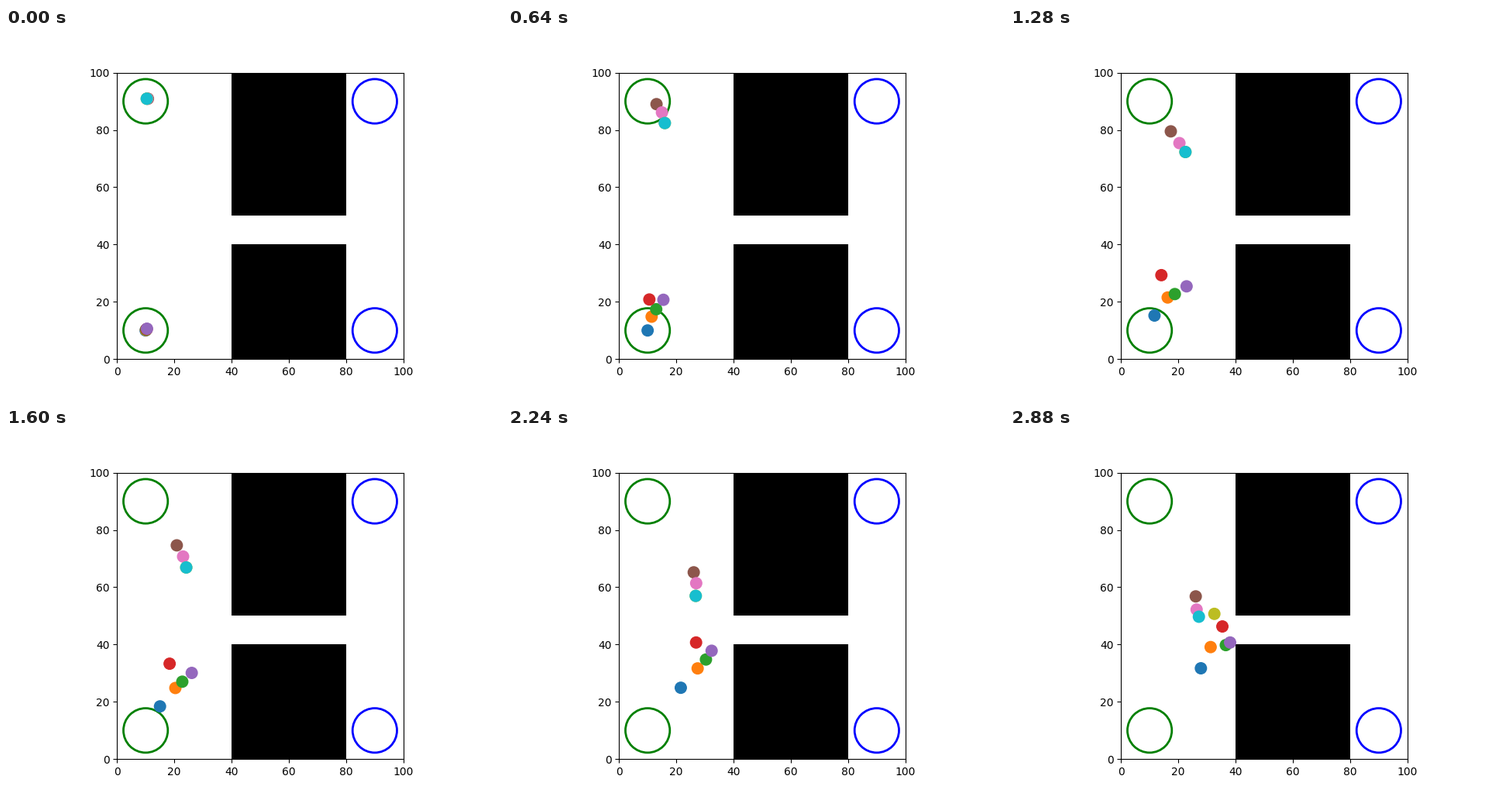
Write a matplotlib script that moves like this. It is 640 px wide and 480 px high and loops after 8 s.

```python
import matplotlib.pyplot as plt
import numpy as np
from matplotlib.animation import FuncAnimation
from matplotlib.patches import Circle, Rectangle

STEP_MS = 160
FRAMES = 50
LAST_MOVE = 18
KEY_STEPS = (0, 4, 8, 13, 18)
SPLIT = 14                 # step at which the olive dot leaves the cyan one
DRIFT = (1.35, 0.25)       # how far it moves away per step

# Each dot glides at an even pace through these places after its start.
LOWER = {
    "C0": [(10, 10), (11.7, 15.2), (20, 23.2), (27.9, 31.7)],
    "C1": [(11.4, 14.8), (16.3, 21.5), (26.5, 29.8), (31.3, 39.1)],
    "C2": [(13, 17.4), (18.8, 22.7), (28.8, 33.5), (36.6, 39.8)],
    "C3": [(10.6, 20.8), (14.1, 29.3), (24.8, 39.3), (35.4, 46.3)],
    "C4": [(15.5, 20.7), (22.9, 25.4), (30.9, 37.1), (38.1, 40.7)],
}
UPPER = {
    "C5": [(13.1, 89), (17.4, 79.5), (26.1, 67.3), (26.1, 56.8)],
    "C6": [(15, 86.1), (20.4, 75.4), (27.1, 63.7), (26.4, 52.2)],
    "C9": [(16, 82.4), (22.5, 72.3), (26.7, 58.8), (27.2, 49.7)],
}


def glide(points, step):
    x, y = zip(*points)
    return np.interp(step, KEY_STEPS, x), np.interp(step, KEY_STEPS, y)


def with_starts(group, start, shift):
    """Put a start before each path, shifted a little from dot to dot."""
    return {color: [(start[0] + k * shift[0], start[1] + k * shift[1]), *path]
            for k, (color, path) in enumerate(group.items())}


paths = {**with_starts(LOWER, (10, 10), (0.12, 0.15)),
         **with_starts(UPPER, (10.8, 90.9), (-0.2, 0))}


def positions(step):
    spots = [glide(path, step) for path in paths.values()]
    cyan = spots.pop()
    away = max(0, step - SPLIT)
    olive = (cyan[0] + DRIFT[0] * away, cyan[1] + DRIFT[1] * away)
    return spots + [olive, cyan]


fig, ax = plt.subplots(figsize=(6.4, 4.8), dpi=100)
ax.set(xlim=(0, 100), ylim=(0, 100), aspect="equal")

for bottom, height in ((0, 40), (50, 50)):
    ax.add_patch(Rectangle((40, bottom), 40, height, color="black", lw=0))
for x, color in ((10, "green"), (90, "blue")):
    for y in (10, 90):
        ax.add_patch(Circle((x, y), 7.75, fill=False, ec=color, lw=2))

colors = [*paths][:-1] + ["C8", "C9"]
dots = ax.scatter(*zip(*positions(0)), s=110, c=colors, zorder=3)


def update(i):
    dots.set_offsets(positions(min(i, LAST_MOVE)))
    return (dots,)


anim = FuncAnimation(fig, update, frames=FRAMES, interval=STEP_MS,
                     repeat=True, repeat_delay=0)
plt.show()
```
